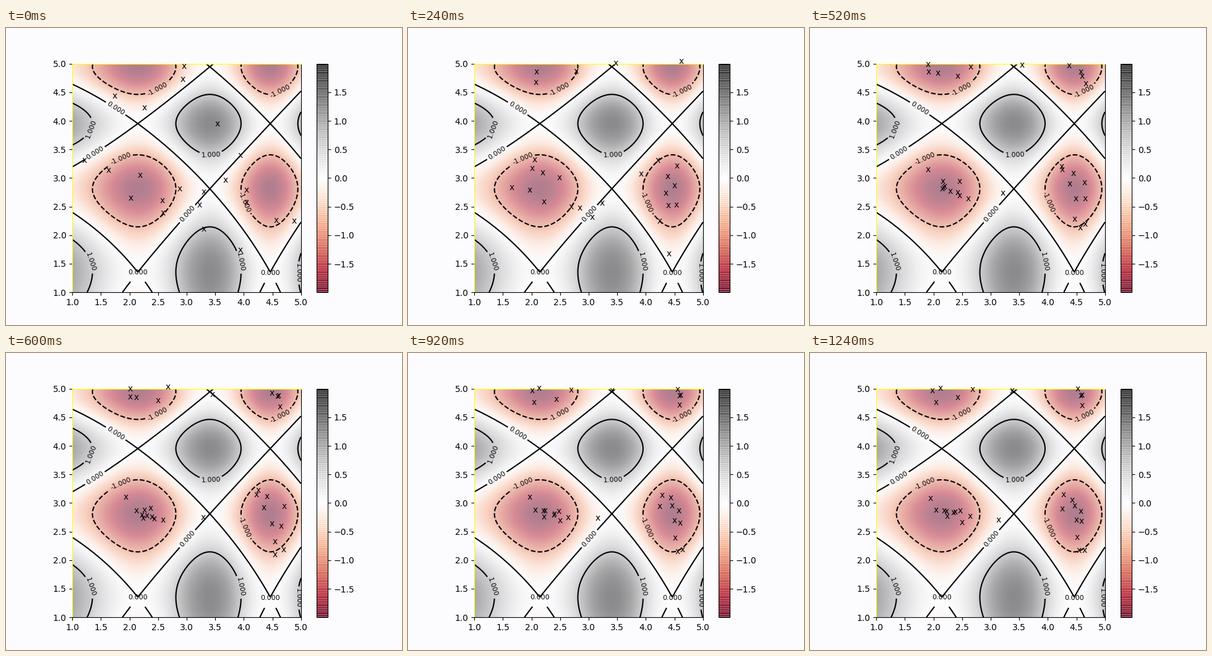
These frames come from a looping animation (640 by 480 pixels, 1280 ms). A matplotlib script:

```python
import numpy as np
import matplotlib.pyplot as plt
from matplotlib.animation import FuncAnimation

W, H = 640, 480
FRAMES, INTERVAL = 32, 40
BACK, EDGE = "#fcfcff", "#ffff00"

# Where the searchers come to rest, in pixels, by valley.
UPPER = [(198, 61), (211, 57), (204, 80), (239, 72), (263, 59), (327, 61),
         (433, 58), (440, 68), (438, 69), (440, 85)]
LEFT = [(195, 235), (204, 254), (217, 255), (221, 256), (222, 264), (232, 258),
        (235, 257), (243, 255), (259, 264), (246, 274), (305, 270)]
RIGHT = [(410, 229), (408, 252), (424, 238), (428, 247), (438, 256), (431, 270),
         (439, 272), (432, 298), (435, 319), (444, 319)]


def anneal(rest, heat=35, cooling=6.5):
    """Random walk whose steps shrink as it cools, ending at rest."""
    rng = np.random.default_rng(4)
    size = heat * np.exp(-np.arange(FRAMES - 1) / cooling)
    steps = size[:, None, None] * rng.normal(size=(FRAMES - 1,) + rest.shape)
    to_go = np.cumsum(steps[::-1], axis=0)[::-1]
    return rest + np.concatenate([to_go, np.zeros((1,) + rest.shape)])


def to_data(px, py):
    scale = 369.6 / 4
    return 1 + (px - 107.2) / scale, 1 + (427.2 - py) / scale


fig = plt.figure(figsize=(W / 100, H / 100), dpi=100, facecolor=BACK)
ax = fig.add_subplot()
ax.set_facecolor(BACK)

grid = np.linspace(1, 5, 600)
X, Y = np.meshgrid(grid, grid)
Z = np.sin(Y ** 1.5) + np.cos(X ** 1.5)

# The middle level sits a hair below zero so the saddles split cleanly.
contours = ax.contour(X, Y, Z, levels=[-1, -0.0001, 1], colors="black",
                      linestyles=["dashed", "solid", "solid"])
image = ax.imshow(Z, extent=[1, 5, 1, 5], origin="lower", cmap="RdGy", alpha=0.5)

# Overlapping cell edges give the bar its darker, striped look.
bar = fig.colorbar(image, ax=ax)
bar.solids.set_edgecolor("face")
bar.solids.set_linewidth(0.7)

ticks = np.arange(1, 5.1, 0.5)
ax.set(xlim=(1, 5), ylim=(1, 5), xticks=ticks, yticks=ticks)
for side in ("left", "top"):
    ax.spines[side].set_color(EDGE)
fig.canvas.draw()

label_px = [(178, 129), (143, 201), (292, 299),
            (244, 98), (443, 102), (185, 211), (386, 281),
            (137, 163), (331, 205), (138, 378), (380, 378), (473, 396)]
spots = [to_data(*p) for p in label_px]
spots += [((k * np.pi) ** (2 / 3), (np.pi / 2) ** (2 / 3) - 0.009)
          for k in (1, 3)]
ax.clabel(contours, inline=True, inline_spacing=3, fontsize=8, manual=spots,
          fmt=lambda v: f"{round(v):.3f}")

tracks = anneal(np.array(UPPER + LEFT + RIGHT, float))
marks = [fig.text(0, 0, "x", fontsize=10, ha="center", va="baseline")
         for _ in tracks[0]]


def update(i):
    for mark, (px, py) in zip(marks, tracks[i]):
        mark.set_position((px / W, (H - py - 4) / H))
        mark.set_visible(111 <= px <= 481 and 54 <= py <= 424)
    return marks


anim = FuncAnimation(fig, update, frames=FRAMES, interval=INTERVAL,
                     repeat=True, repeat_delay=0, blit=False)
plt.show()
```
